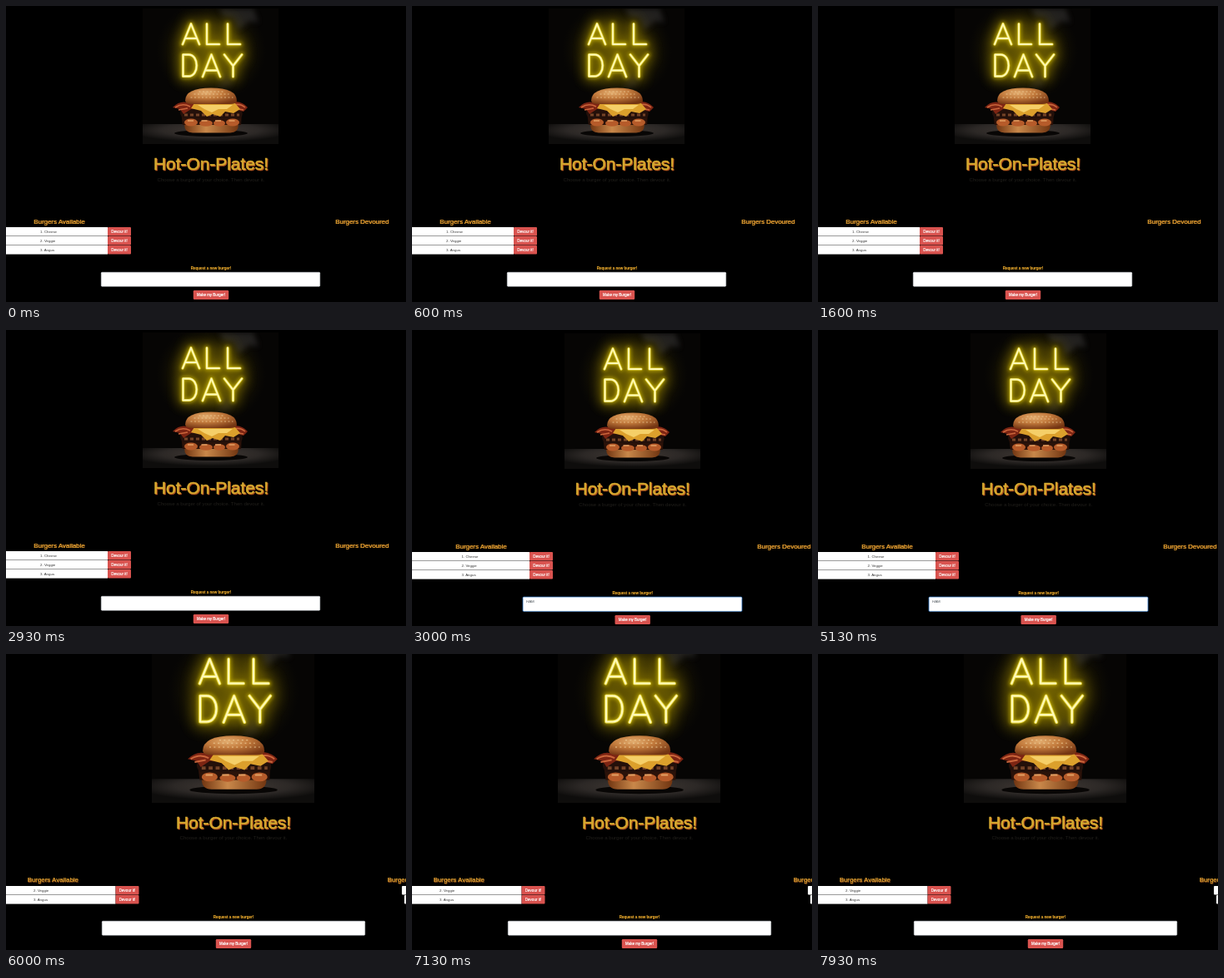
Animation of 480x356 px, one loop 8000 ms. Source, as an HTML page:

```html
<!DOCTYPE html>
<html lang="en">
<head>
<meta charset="utf-8">
<title>Burger order page</title>
<style>
html, body { margin: 0; width: 100%; height: 100%; overflow: hidden; background: #000; }
svg { display: block; width: 100vw; height: 100vh; font-family: "Liberation Sans", Arial, sans-serif; }
</style>
</head>
<body>
<svg id="stage" viewBox="0 0 480 356">
  <defs>
    <radialGradient id="glow">
      <stop offset="0" stop-color="#5c4d02" stop-opacity=".9"/>
      <stop offset=".5" stop-color="#3e3402" stop-opacity=".7"/>
      <stop offset="1" stop-color="#151203" stop-opacity="0"/>
    </radialGradient>
    <radialGradient id="table" cx=".5" cy=".3" r=".6">
      <stop offset="0" stop-color="#423a35"/>
      <stop offset=".6" stop-color="#2c2826"/>
      <stop offset="1" stop-color="#0e0d0c"/>
    </radialGradient>
    <radialGradient id="bun" cx=".4" cy=".3" r=".75">
      <stop offset="0" stop-color="#e3ad6f"/>
      <stop offset=".45" stop-color="#c27a3c"/>
      <stop offset="1" stop-color="#743513"/>
    </radialGradient>
    <linearGradient id="heel">
      <stop offset="0" stop-color="#713511"/>
      <stop offset=".4" stop-color="#c9884a"/>
      <stop offset="1" stop-color="#713511"/>
    </linearGradient>
    <filter id="soft" x="-40%" y="-40%" width="180%" height="180%"><feGaussianBlur stdDeviation="3"/></filter>
    <filter id="halo" x="-40%" y="-40%" width="180%" height="180%"><feGaussianBlur stdDeviation="2"/></filter>
    <filter id="wide" x="-60%" y="-60%" width="220%" height="220%"><feGaussianBlur stdDeviation="7"/></filter>
    <filter id="melt" x="-5%" y="-5%" width="110%" height="110%"><feGaussianBlur stdDeviation=".55"/></filter>
    <clipPath id="frame"><path d="M0 0H163V163H0Z"/></clipPath>
    <path id="neon" d="M48 43 58 18.5 68 43M52 36H64M77 18.500V43H92M102 18.500V43H117
      M48.500 55.500V81.500H55C68 81.500 68 55.500 55 55.500ZM72 82 82.500 55.500 93 82M76 74.500H89M98 55.500 108.500 69V82M119 55.500 108.500 69"/>
    <g id="photo" clip-path="url(#frame)">
      <path fill="#060504" d="M0 0H163V163H0Z"/>
      <ellipse cx="82" cy="51" rx="66" ry="62" fill="url(#glow)"/>
      <path d="M91 0H133L139 17 128 15 115 26 109 12 98 10Z" fill="#4b4947" opacity=".4" filter="url(#soft)"/>
      <path d="M88 76Q96 84 91 96L105 94 110 82Z" fill="#3d3832" opacity=".35" filter="url(#soft)"/>
      <path d="M0 139H163V163H0Z" fill="url(#table)"/>
      <g fill="none" stroke-linecap="round" stroke-linejoin="round">
        <use href="#neon" stroke="#8f7b00" stroke-width="11" opacity=".75" filter="url(#wide)"/>
        <use href="#neon" stroke="#d0bb00" stroke-width="5.500" opacity=".65" filter="url(#halo)"/>
        <g filter="url(#melt)">
          <use href="#neon" stroke="#e3d23a" stroke-width="3.200"/>
          <use href="#neon" stroke="#fffab8" stroke-width="1.800"/>
        </g>
      </g>
      <g filter="url(#melt)">
        <ellipse cx="82" cy="150" rx="44" ry="4" fill="#080605"/>
        <path d="M50 139H115Q115 149.500 105 149.500H60Q50 149.500 50 139Z" fill="url(#heel)"/>
        <path d="M46 124H119L118 140H48Z" fill="#2b1209"/>
        <g fill="#b65b2a">
          <ellipse cx="58" cy="137" rx="8" ry="4.500"/>
          <ellipse cx="76" cy="138" rx="8" ry="3.800"/>
          <ellipse cx="92" cy="138" rx="7" ry="3.800"/>
          <ellipse cx="108" cy="137" rx="8" ry="4.500"/>
        </g>
        <path d="M54 135H112" stroke="#e3a063" stroke-width="1.500" stroke-dasharray="7 9.500"/>
        <path d="M46 121H118Q122 128 117 132H49Q43 128 46 121Z" fill="#24100a"/>
        <path d="M50 128H116" stroke="#754327" stroke-width="3" stroke-dasharray="4 3"/>
        <path d="M36 119Q44 111 53 113L112 112Q121 113 126 119L121 124 111 121 100 121 58 121 49 127 45 121Z" fill="#7d2513"/>
        <path d="M39 119Q48 113 57 118M106 117Q116 113 123 119M43 122 54 120M110 120 121 122" fill="none" stroke="#cb653b" stroke-width="1.600"/>
        <path d="M62 114H111L117 121 109 126 99 124 93 130 84 127 77 130 70 123 58 120Z" fill="#dca02c"/>
        <path d="M66 116H108L101 121 91 121 83 125 74 121Z" fill="#f5cf68"/>
        <path d="M51 111Q51 95.500 82 95.500T113 111Q112 115 105 115H59Q52 115 51 111Z" fill="url(#bun)"/>
        <path d="M62 103H103M68 100H97M58 107H108" stroke="#efcd98" stroke-width=".8" stroke-dasharray="1 3.500" stroke-linecap="round"/>
      </g>
    </g>
  </defs>
</svg>
<script>
const LOOP = 8000;
const RED = "#d9534f", GOLD = "#e2a432";
const stage = document.getElementById("stage");

const layouts = [
  { from: 0, photo: [164, 3, 163], mid: 246, title: 197, sub: 211, heads: [33.3, 395.3, 261.8],
    rows: ["1. Cheese", "2. Veggie", "3. Angus"], top: 266, split: 122, label: 41,
    ask: 316.6, box: [114, 320, 263], button: 342 },
  { from: 3000, photo: [183, 4, 163], mid: 264.7, title: 198, sub: 212, heads: [52.3, 414.3, 262.8],
    rows: ["1. Cheese", "2. Veggie", "3. Angus"], top: 267, split: 141, label: 59.5,
    ask: 318, box: [133, 321, 263], button: 343, typed: "HAM" },
  { from: 6000, photo: [175, -16, 195], mid: 273, title: 210, sub: 223, heads: [25.7, 457.7, 274.3],
    rows: ["2. Veggie", "3. Angus"], top: 279, split: 131.5, label: 33,
    ask: 318, box: [115, 321, 316], button: 343, done: [475, 478] }
];

function add(parent, tag, attrs, text) {
  const el = document.createElementNS("http://www.w3.org/2000/svg", tag);
  for (const key in attrs) el.setAttribute(key, attrs[key]);
  if (text) el.textContent = text;
  parent.append(el);
  return el;
}

function rect(g, x, y, width, height, fill, extra) {
  add(g, "rect", { x, y, width, height, fill, ...extra });
}

function write(g, x, y, size, fill, text, extra) {
  add(g, "text", { x, y, "font-size": size, fill, ...extra }, text);
}

function drawTitle(g, x, y) {
  const text = "Hot-On-Plates!", center = { "text-anchor": "middle", "stroke-width": .6 };
  write(g, x + 1, y + .9, 20.9, "#b3521f", text, { ...center, stroke: "#b3521f" });
  write(g, x, y, 20.9, "#d6aa30", text, { ...center, stroke: "#d6aa30" });
}

function drawHead(g, x, y, text) {
  write(g, x + .5, y + .4, 7.9, "#a85a1e", text);
  write(g, x, y, 7.9, GOLD, text, { stroke: GOLD, "stroke-width": .22 });
}

function drawRow(g, s, name, y) {
  rect(g, 0, y, s.split, 10.6, "#fff");
  rect(g, s.split, y, 28, 10.6, RED, { rx: 1 });
  write(g, s.label, y + 7, 4.4, "#333", name);
  write(g, s.split + 14, y + 7, 4.6, "#fff", "Devour it!",
    { "text-anchor": "middle", stroke: "#fff", "stroke-width": .15 });
}

function drawField(g, [x, y, width], typed) {
  if (typed) rect(g, x - .6, y - .6, width + 1.2, 18.7, "#00274f", { rx: 1.6 });
  rect(g, x + .25, y + .25, width - .5, 17, "#fff",
    { rx: 1, stroke: typed ? "#80bdff" : "#ced4da", "stroke-width": .5 });
  if (typed) write(g, x + 4, y + 7, 4.4, "#495057", typed);
}

function build(s) {
  const g = add(stage, "g", {}), center = { "text-anchor": "middle" };
  const [px, py, size] = s.photo, [hx, dx, hy] = s.heads;
  add(g, "use", { href: "#photo", transform: `translate(${px} ${py}) scale(${size / 163})` });
  drawTitle(g, s.mid, s.title);
  write(g, s.mid, s.sub, 6.1, "#211f1b", "Choose a burger of your choice. Then devour it.", center);
  drawHead(g, hx, hy, "Burgers Available");
  drawHead(g, dx, hy, "Burgers Devoured");
  s.rows.forEach((name, i) => drawRow(g, s, name, s.top + i * 11));
  (s.done || []).forEach((x, i) => rect(g, x, s.top + i * 11, 10, 10.6, "#fff", { rx: 1 }));
  write(g, s.mid, s.ask, 4.5, "#f0ae2e", "Request a new burger!",
    { ...center, "font-weight": "bold", stroke: "#f0ae2e", "stroke-width": .12 });
  drawField(g, s.box, s.typed);
  rect(g, s.mid - 21.2, s.button, 42.4, 11, RED, { rx: 1.2 });
  write(g, s.mid, s.button + 7.1, 4.45, "#fff", "Make my Burger!",
    { ...center, stroke: "#fff", "stroke-width": .18 });
  return g;
}

const scenes = layouts.map(build);

function update(t) {
  const current = layouts.findLastIndex(s => t >= s.from);
  scenes.forEach((g, i) => g.style.display = i === current ? "" : "none");
}

function tick() {
  update(performance.now() % LOOP);
  requestAnimationFrame(tick);
}
tick();
</script>
</body>
</html>
```
